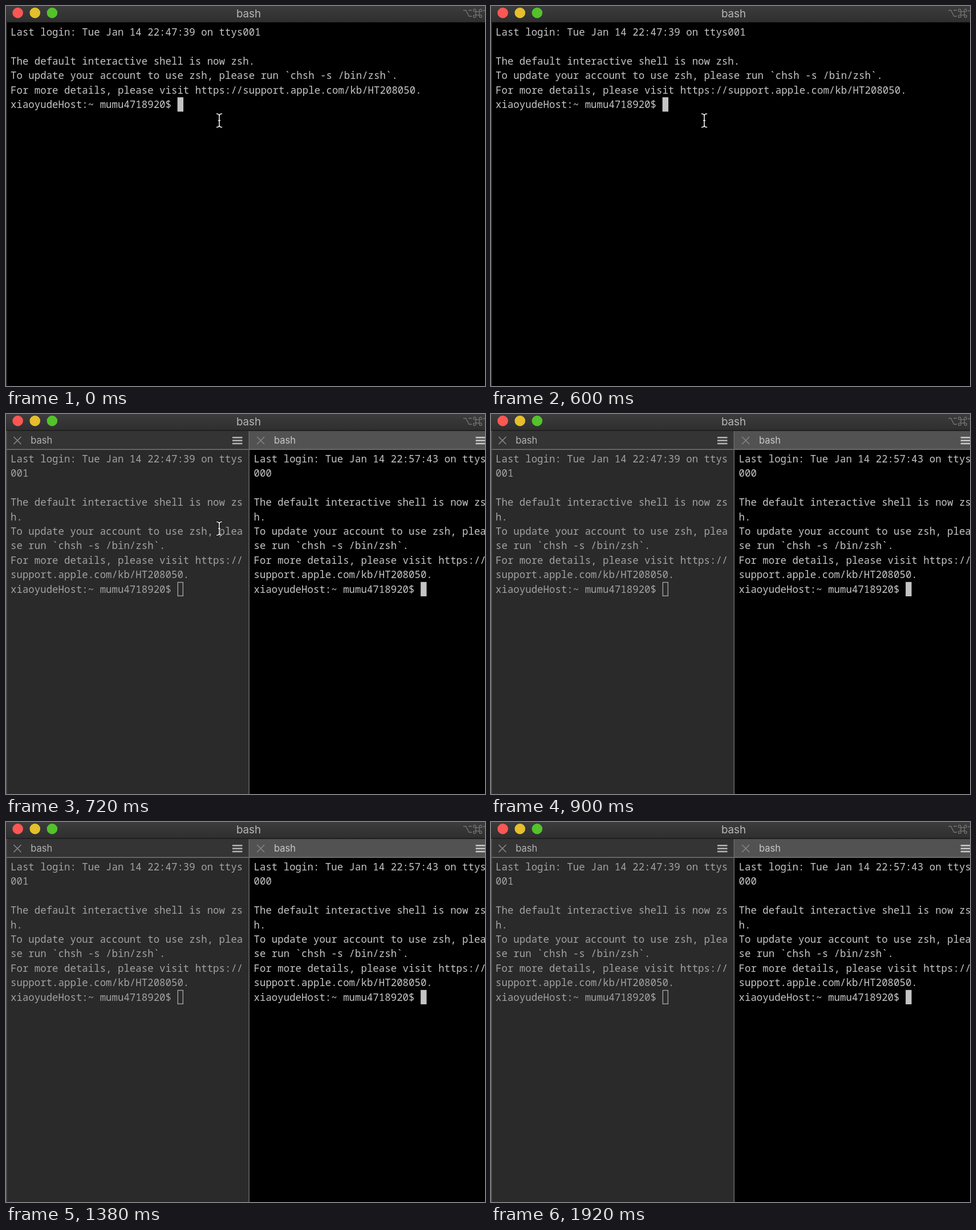
Recreate the animation shown at these times as an HTML page with a canvas. Size 840 by 667 pixels, loop 1.98 s.

```html
<!DOCTYPE html>
<html lang="en">
<head>
<meta charset="utf-8">
<title>Terminal split</title>
<style>
html, body { margin: 0; width: 100%; height: 100%; overflow: hidden; background: #000; }
canvas { display: block; }
</style>
</head>
<body>
<canvas id="stage" width="840" height="667"></canvas>
<script>
const ctx = document.getElementById('stage').getContext('2d');
const W = 840, H = 667, LOOP = 1980;
const SPLIT_AT = 660, SHELL_AT = 720, POINTER_OFF = 900;
const MONO = '17.42px "Noto Sans Mono", "DejaVu Sans Mono", monospace';
const CHAR = 10.452, LINE = 25.4, DIVIDER = 426;
const BRIGHT = '#c6c6c6', DIM = '#a2a2a2';
const PROMPT = 'xiaoyudeHost:~ mumu4718920$ ';

const greeting = login => [
  'Last login: Tue Jan 14 ' + login,
  '',
  'The default interactive shell is now zsh.',
  'To update your account to use zsh, please run `chsh -s /bin/zsh`.',
  'For more details, please visit https://support.apple.com/kb/HT208050.',
  PROMPT
];

function wrap(lines, cols) {
  return lines.flatMap(s => {
    const rows = [];
    do { rows.push(s.slice(0, cols)); s = s.slice(cols); } while (s);
    return rows;
  });
}

function rect(x, y, w, h, color) {
  ctx.fillStyle = color;
  ctx.fillRect(x, y, w, h);
}

function stroke(path, color, width) {
  ctx.strokeStyle = color;
  ctx.lineWidth = width;
  ctx.stroke(new Path2D(path));
}

function label(text, x, y, size, color, align = 'left') {
  ctx.font = size + 'px Inter, Roboto, sans-serif';
  ctx.textAlign = align;
  ctx.fillStyle = color;
  ctx.fillText(text, x, y);
}

function shell(rows, x, y, color, active) {
  ctx.font = MONO;
  ctx.textAlign = 'left';
  ctx.fillStyle = color;
  rows.forEach((row, i) => ctx.fillText(row, x, y + i * LINE));
  const last = rows.length - 1;
  const cx = x + rows[last].length * CHAR;
  const cy = y + last * LINE - 18.8;
  if (active) {
    rect(cx, cy, 10.4, 25.2, '#c4c4c4');
  } else {
    ctx.strokeStyle = color;
    ctx.lineWidth = 1.4;
    ctx.strokeRect(cx + 0.7, cy + 0.7, 9, 23.8);
  }
}

function titleBar(title) {
  const g = ctx.createLinearGradient(0, 0, 0, 29);
  g.addColorStop(0, '#3c3c3d');
  g.addColorStop(1, '#2e2e2f');
  rect(0, 0, W, 29, g);
  rect(0, 28, W, 1, '#1c1c1c');
  ['#fc5753', '#e5bf2c', '#53c22b'].forEach((color, i) => {
    ctx.fillStyle = color;
    ctx.beginPath();
    ctx.arc(20.7 + i * 30.1, 12, 9.3, 0, Math.PI * 2);
    ctx.fill();
  });
  label(title, 425.5, 19.5, 18.8, '#b6b6b6', 'center');
  shortcut();
}

// Option, command and the clipped digit of the window shortcut.
function shortcut() {
  const color = '#747474';
  stroke('M802 7.5H806.5L812 18H817M811 7.5H817', color, 1.4);
  stroke('M824 9.8H830V15.8H824ZM824 9.8H822A2.2 2.2 0 1 1 824 7.6V9.8' +
    'M830 9.8V7.6A2.2 2.2 0 1 1 832 9.8H830M830 15.8H832A2.2 2.2 0 1 1 830 18V15.8' +
    'M824 15.8V18A2.2 2.2 0 1 1 822 15.8H824', color, 1.3);
  stroke('M836.5 9.5L840 6.8', color, 1.5);
}

function tab(x, w, bg, name, ink, icon) {
  rect(x, 29, w, 33, bg);
  rect(x, 29, w, 1, '#242424');
  rect(x, 61.5, w, 1.5, '#747474');
  stroke(`M${x + 13.5} 40l13 13m0 -13l-13 13`, icon, 1.6);
  label(name, x + 43.2, 52, 16.6, ink);
  for (let i = 0; i < 3; i++) rect(x + 397, 40 + i * 5.3, 17.5, 2.6, ink);
}

function pointer() {
  const beam = 'M369.5 189.2Q374 189.2 374 193V209Q374 212.8 369.5 212.8' +
    'M378.5 189.2Q374 189.2 374 193M374 209Q374 212.8 378.5 212.8M372.5 201H375.5';
  ctx.lineCap = 'round';
  stroke(beam, '#000', 3.2);
  stroke(beam, '#f2f2f2', 1.6);
  ctx.lineCap = 'butt';
}

const first = greeting('22:47:39 on ttys001');
const second = greeting('22:57:43 on ttys000');
const wide = wrap(first, 80), left = wrap(first, 39), right = wrap(second, 39);

function draw(t) {
  const split = t >= SPLIT_AT, ready = t >= SHELL_AT;
  rect(0, 0, W, H, '#000');
  titleBar(split && !ready ? '' : 'bash');
  if (split) {
    rect(0, 29, DIVIDER, H - 29, '#2a2a2a');
    tab(0, DIVIDER, '#343434', 'bash', '#b2b2b2', '#898989');
    tab(DIVIDER + 0.7, W - DIVIDER, '#525252', ready ? 'bash' : '', '#c8c8c8', '#858585');
    shell(left, 8, 85, DIM, false);
    shell(ready ? right : [''], 434.5, 85, BRIGHT, true);
    rect(DIVIDER - 0.5, 30, 1.5, H - 30, '#686868');
  } else {
    shell(wide, 8, 52, BRIGHT, true);
  }
  rect(0, 29, 1.5, H - 29, split ? '#565656' : '#3a3a3a');
  if (t < POINTER_OFF) pointer();
}

const start = performance.now();
function tick() {
  draw((performance.now() - start) % LOOP);
  requestAnimationFrame(tick);
}
tick();
</script>
</body>
</html>
```
